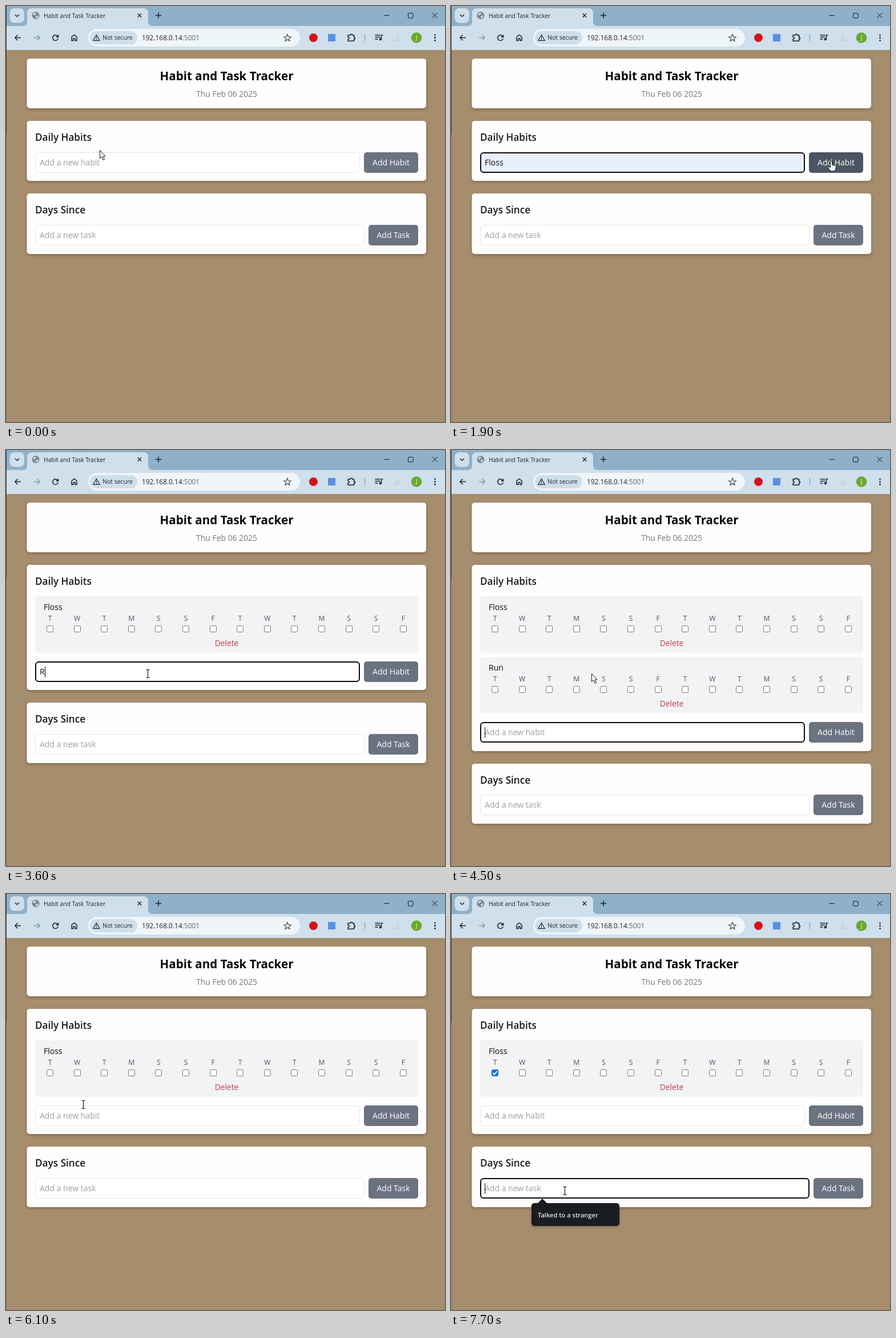
Write an HTML page with a canvas that moves like this. It is 769 by 728 pixels and loops after 8 s.

```html
<!DOCTYPE html>
<html lang="en">
<head>
<meta charset="utf-8">
<title>Habit and Task Tracker</title>
<style>
html, body { margin: 0; width: 100%; height: 100%; overflow: hidden; background: #a68d6d; }
canvas { display: block; }
</style>
</head>
<body>
<canvas id="stage" width="769" height="728"></canvas>
<script>
const ctx = document.getElementById('stage').getContext('2d');
const LOOP = 8000, STEP = 100, PITCH = 106.4;
const SANS = '"Open Sans", "Noto Sans", sans-serif';
const ARIAL = '"Liberation Sans", Arial, sans-serif';
const DAYS = 'TWTMSSFTWTMSSF';
const DARK = '#1f2328', INK = '#111418';

// Moments at which the page state changes
const AT = { open: 500, hover: 800, pick: 1200, add: 2100, focus: 3000,
  r: 3500, u: 4000, n: 4100, enter: 4300, remove: 5500, check: 6400,
  task: 7600, hint: 7700 };

// Pointer stops: time, x, y
const STOPS = [
  [0, 165, 252], [200, 165, 252], [500, 168, 275], [600, 168, 275],
  [900, 170, 307], [1300, 170, 307], [1900, 666, 272], [2400, 666, 272],
  [3000, 248, 391], [4300, 248, 391], [4400, 247, 391], [4700, 247, 391],
  [5300, 386, 443], [5700, 386, 443], [6100, 135, 368], [6400, 77, 313],
  [6700, 77, 313], [7400, 199, 519], [LOOP, 199, 519]
];

function pointerAt(t) {
  let i = 1;
  while (i < STOPS.length - 1 && t > STOPS[i][0]) i++;
  const [t0, x0, y0] = STOPS[i - 1], [t1, x1, y1] = STOPS[i];
  const p = Math.min(1, (t - t0) / (t1 - t0)), e = p * p * (3 - 2 * p);
  return { x: Math.round(x0 + (x1 - x0) * e), y: Math.round(y0 + (y1 - y0) * e) };
}

function stateAt(t) {
  const between = (a, b) => t >= a && t < b;
  const s = { habits: [], text: '', focus: '', since: 0, fill: false, preview: false,
    checked: t >= AT.check, hint: '', hover: false };
  if (t >= AT.add) s.habits.push('Floss');
  if (between(AT.enter, AT.remove)) s.habits.push('Run');
  if (between(AT.open, AT.add)) {
    s.focus = 'habit';
    s.since = t >= AT.pick ? AT.pick : AT.open;
    if (t < AT.pick) s.hint = 'Floss';
    s.hover = s.preview = between(AT.hover, AT.pick);
    if (t >= AT.hover) s.text = 'Floss';
    s.fill = t >= AT.hover;
  }
  if (between(AT.focus, AT.remove)) {
    s.focus = 'habit';
    s.since = [AT.enter, AT.n, AT.u, AT.r].find(k => t >= k) || AT.focus;
    if (between(AT.r, AT.enter)) s.text = t >= AT.n ? 'Run' : t >= AT.u ? 'Ru' : 'R';
  }
  if (t >= AT.task) { s.focus = 'task'; s.since = AT.task; }
  if (t >= AT.hint) s.hint = 'Talked to a stranger';
  return s;
}

function box(x, y, w, h, r, fill, stroke, width = 1) {
  ctx.beginPath();
  ctx.roundRect(x, y, w, h, r);
  if (fill) { ctx.fillStyle = fill; ctx.fill(); }
  if (stroke) { ctx.strokeStyle = stroke; ctx.lineWidth = width; ctx.stroke(); }
}

function disc(x, y, r, color) {
  ctx.fillStyle = color;
  ctx.beginPath();
  ctx.arc(x, y, r, 0, Math.PI * 2);
  ctx.fill();
}

function path(d, x, y, stroke, width = 1.5, fill) {
  ctx.save();
  ctx.translate(x, y);
  const p = new Path2D(d);
  if (fill) { ctx.fillStyle = fill; ctx.fill(p); }
  if (stroke) { ctx.strokeStyle = stroke; ctx.lineWidth = width; ctx.stroke(p); }
  ctx.restore();
}

function text(str, x, y, size, color, weight = 400, align = 'left', family = SANS) {
  ctx.font = `${weight} ${size}px ${family}`;
  ctx.textAlign = align;
  ctx.fillStyle = color;
  ctx.fillText(str, x, y);
}

function drawTabs() {
  ctx.fillStyle = '#8eb0c8';
  ctx.fillRect(0, 0, 769, 36);
  box(6.5, 4, 25.5, 25.5, 8, '#cfdfeb');
  path('M-3.5 -1.5L0 2L3.5 -1.5', 19.5, 16.5, DARK);
  path('M29 35Q37 35 37 27V12Q37 4 46 4H240Q249 4 249 12V27Q249 35 257 35Z', 0, 0, null, 0, '#cfdfeb');
  disc(52, 16.5, 6.5, '#7d8790');
  path('M-4 -3L-1 -5L1 -3L-1 -1L-4 0ZM1 1L4 0L4 3L1 5L0 3Z', 52, 16.5, null, 0, '#cfdfeb');
  text('Habit and Task Tracker', 66, 20.5, 10.3, DARK);
  path('M-3.2 -3.2L3.2 3.2M3.2 -3.2L-3.2 3.2', 234, 16.5, DARK, 1.4);
  path('M-5 0H5M0 -5V5', 267, 16.5, DARK, 1.5);
  path('M-4.5 0H4.5', 667, 16.5, INK, 1);
  box(704.5, 12.5, 8.5, 8.5, 1.5, null, INK);
  path('M-4.5 -4.5L4.5 4.5M4.5 -4.5L-4.5 4.5', 751, 16.5, INK, 1);
}

function drawToolbar() {
  ctx.fillStyle = '#cfdfeb';
  ctx.fillRect(0, 35, 769, 42);
  const arrow = 'M5 0H-5M-0.5 -4.8L-5.2 0L-0.5 4.8';
  path(arrow, 21, 55.5, DARK, 1.5);
  ctx.save();
  ctx.translate(54, 55.5);
  ctx.scale(-1, 1);
  path(arrow, 0, 0, '#8599a8', 1.5);
  ctx.restore();
  path('M4.2 -2.2A4.8 4.8 0 1 0 4.7 1.4M5 -5V-1.4H1.4', 86.5, 55.5, DARK, 1.6);
  path('M-4.5 5V-1.5L0 -5L4.5 -1.5V5H1.5V1.2H-1.5V5Z', 119.5, 55.5, DARK, 1.5);

  box(144, 40, 371, 31, 15.5, '#f0f5f9');
  box(147, 44, 83, 23, 11.5, '#cfdfea');
  path('M0 -5L5.7 4.8H-5.7ZM0 -1.8V1.6M0 2.6V3.8', 158.5, 55.5, DARK, 1.2);
  text('Not secure', 169, 59.3, 10.5, DARK, 500);
  text('192.168.0.14', 238, 60, 11.9, DARK);
  const w = ctx.measureText('192.168.0.14').width;
  text(':5001', 238 + w, 60, 11.9, '#5d666e');

  let star = '';
  for (let i = 0; i < 10; i++) {
    const r = i % 2 ? 2.8 : 6.6, a = i * Math.PI / 5;
    star += `${i ? 'L' : 'M'}${r * Math.sin(a)} ${-r * Math.cos(a)}`;
  }
  path(star + 'Z', 493, 56, '#3c444b', 1.2);

  disc(538.5, 55.5, 7.5, '#d5101c');
  ctx.fillStyle = '#5a8fe0';
  ctx.fillRect(564, 49, 13, 13);
  path('M-5.8 -4H-1.8A1.8 1.8 0 0 1 1.8 -4H4.5V-.4A1.8 1.8 0 0 1 4.5 3.2V6.2H-5.8V3A1.8 1.8 0 0 0 -5.8 -.8Z', 605, 55, DARK, 1.6);
  path('M0 -6V6', 628.5, 55.5, '#86abc5', 1.5);
  path('M-6.5 -4.5H2.5M-6.5 -1H2.5M-6.5 2.5H-1.5M4.5 3V-4.5H7.5', 653, 55.5, DARK, 1.5);
  disc(655.8, 58.3, 2.1, DARK);
  path('M0 -5V2M-3 -1L0 2L3 -1M-5 3V5H5V3', 686, 55.5, '#bccfdd', 1.3);
  disc(719, 55.5, 9.3, '#69a92f');
  text('J', 719, 59.2, 10, '#fff', 400, 'center');
  for (let i = -1; i < 2; i++) disc(751.5, 55.5 + i * 4.7, 1.4, DARK);
}

function card(y, h) {
  const top = Math.round(y), bottom = Math.round(y + h);
  ctx.save();
  ctx.shadowColor = 'rgba(40,25,10,.32)';
  ctx.shadowBlur = 5;
  ctx.shadowOffsetY = 2;
  box(36.5, top, 699.5, bottom - top, 5, '#fffefe');
  ctx.restore();
}

function habitRow(name, y, checked) {
  box(51, Math.round(y), 671, 99, 5, '#f2f3f5');
  text(name, 66, y + 23.5, 14, '#0c0d0f');
  [...DAYS].forEach((day, i) => {
    const x = 77 + i * 47.6, on = checked && !i;
    text(day, x, y + 42.8, 12.2, '#50565f', 400, 'center');
    const left = Math.round(x - 6) + .5, top = Math.round(y + 50.6) + .5;
    box(left, top, 11, 11, 2, on ? '#0b74e8' : '#fff', on ? '#0b74e8' : '#70757a');
    if (on) path('M-3.5 .2L-1 2.8L3.8 -2.8', left + 5.5, top + 5.5, '#fff', 1.8);
  });
  text('Delete', 386.5, y + 86.5, 13.8, '#c83a4c', 400, 'center');
}

// Draws one input with its button
function field(f, s, t) {
  const focused = s.focus === f.id, value = focused ? s.text : '';
  const filled = focused && s.fill;
  if (focused) box(52, f.y + 1, f.w - 2, 34, 5, filled ? '#e8f0fe' : '#fff', '#0a0a0c', 2);
  else box(51.5, f.y + .5, f.w - 1, 35, 5, '#fff', '#e3e5e9');
  const base = f.y + 23.2;
  if (!value) text(f.hint, 59, base, 14, '#9a9fa8');
  else if (s.preview) text(value, 59, base, 12.2, '#0c0d0f', 400, 'left', ARIAL);
  else text(value, 59, base, 14, '#0c0d0f');
  if (focused && Math.floor((t - s.since) / 500) % 2 === 0) {
    const dx = value && !s.preview ? ctx.measureText(value).width : 0;
    ctx.fillStyle = '#000';
    ctx.fillRect(Math.round(59 + dx), f.y + 9, 1, 19);
  }
  box(f.bx, f.y, 722 - f.bx, 36, 5, f.hot ? '#4b5563' : '#6b7280');
  text(f.label, (f.bx + 722) / 2, base, 14, '#fff', 400, 'center');
}

function popup(y, s) {
  const w = s.hint === 'Floss' ? 142 : 154;
  path('M-9 9L0 0L9 9Z', 160, y, null, 0, '#191c21');
  ctx.save();
  ctx.shadowColor = 'rgba(0,0,0,.3)';
  ctx.shadowBlur = 4;
  ctx.shadowOffsetY = 1;
  box(141, y + 8, w, 40, 5, '#191c21');
  ctx.restore();
  if (s.hover) {
    box(144, y + 11, w - 6, 34, 2, '#2f3338');
    path('M-3.7 -3.7L3.7 3.7M3.7 -3.7L-3.7 3.7', 263.5, y + 28.5, '#d8dadd', 1.4);
  }
  text(s.hint, 152, y + 32.5, 11.1, '#e6e8ea', 600);
}

function drawPointer({ x, y }, kind) {
  if (kind === 'beam') {
    path('M-3 -7H-1L0 -6L1 -7H3M0 -6V6M-3 7H-1L0 6L1 7H3', x + .5, y + .5, '#15171a', 1.2);
  } else if (kind === 'hand') {
    path('M-1.5 0Q0 -1.5 1.5 0V6L6.5 7Q8.5 7.5 8.5 9.5L7.5 14L6 17H-1L-5.5 10.5Q-5 8.5 -3 9.5L-1.5 11Z', x, y, '#111', 1, '#fff');
  } else {
    path('M0 0V14L3.2 11.2L5.5 16.8L8 15.8L5.7 10.4H9.5Z', x - .5, y + .5, '#111', 1, '#fff');
  }
}

function draw(t) {
  const s = stateAt(t), p = pointerAt(t), n = s.habits.length;
  const shift = n ? 114 + (n - 1) * PITCH : 0;
  const habit = { id: 'habit', y: Math.round(255.7 + shift), w: 569, bx: 627, hint: 'Add a new habit', label: 'Add Habit' };
  const task = { id: 'task', y: Math.round(383 + shift), w: 577, bx: 635, hint: 'Add a new task', label: 'Add Task' };

  let kind = 'arrow';
  for (const f of [habit, task]) {
    if (p.y < f.y - 3 || p.y > f.y + 38) continue;
    f.hot = p.x >= f.bx && p.x <= 722;
    if (f.hot) kind = 'hand';
    else if (p.x >= 51 && p.x <= 51 + f.w) kind = 'beam';
  }
  s.habits.forEach((_, i) => {
    if (Math.abs(p.x - 386.5) < 21 && Math.abs(p.y - 337 - i * PITCH) < 10) kind = 'hand';
  });

  ctx.fillStyle = '#a68d6d';
  ctx.fillRect(0, 0, 769, 728);
  drawTabs();
  drawToolbar();
  ctx.fillStyle = '#37332f';
  ctx.fillRect(0, 0, 1, 225);
  ctx.fillStyle = '#7d7266';
  ctx.fillRect(0, 225, 1, 503);

  card(92, 87);
  text('Habit and Task Tracker', 386.5, 130, 20.6, '#08090b', 700, 'center');
  text('Thu Feb 06 2025', 386.5, 159.3, 13.9, '#71767f', 400, 'center');

  card(201, 105.3 + shift);
  text('Daily Habits', 51, 235.8, 17.1, '#15181d', 600);
  s.habits.forEach((name, i) => habitRow(name, 256 + i * PITCH, s.checked));
  field(habit, s, t);

  card(328.4 + shift, 105.3);
  text('Days Since', 51, 363.3 + shift, 17.2, '#15181d', 600);
  field(task, s, t);

  if (s.hint) popup((s.focus === 'task' ? task.y : habit.y) + 36, s);
  drawPointer(p, kind);
}

const start = performance.now();
function tick() {
  const t = (performance.now() - start) % LOOP;
  draw(Math.floor(t / STEP) * STEP);
  requestAnimationFrame(tick);
}
tick();
</script>
</body>
</html>
```
